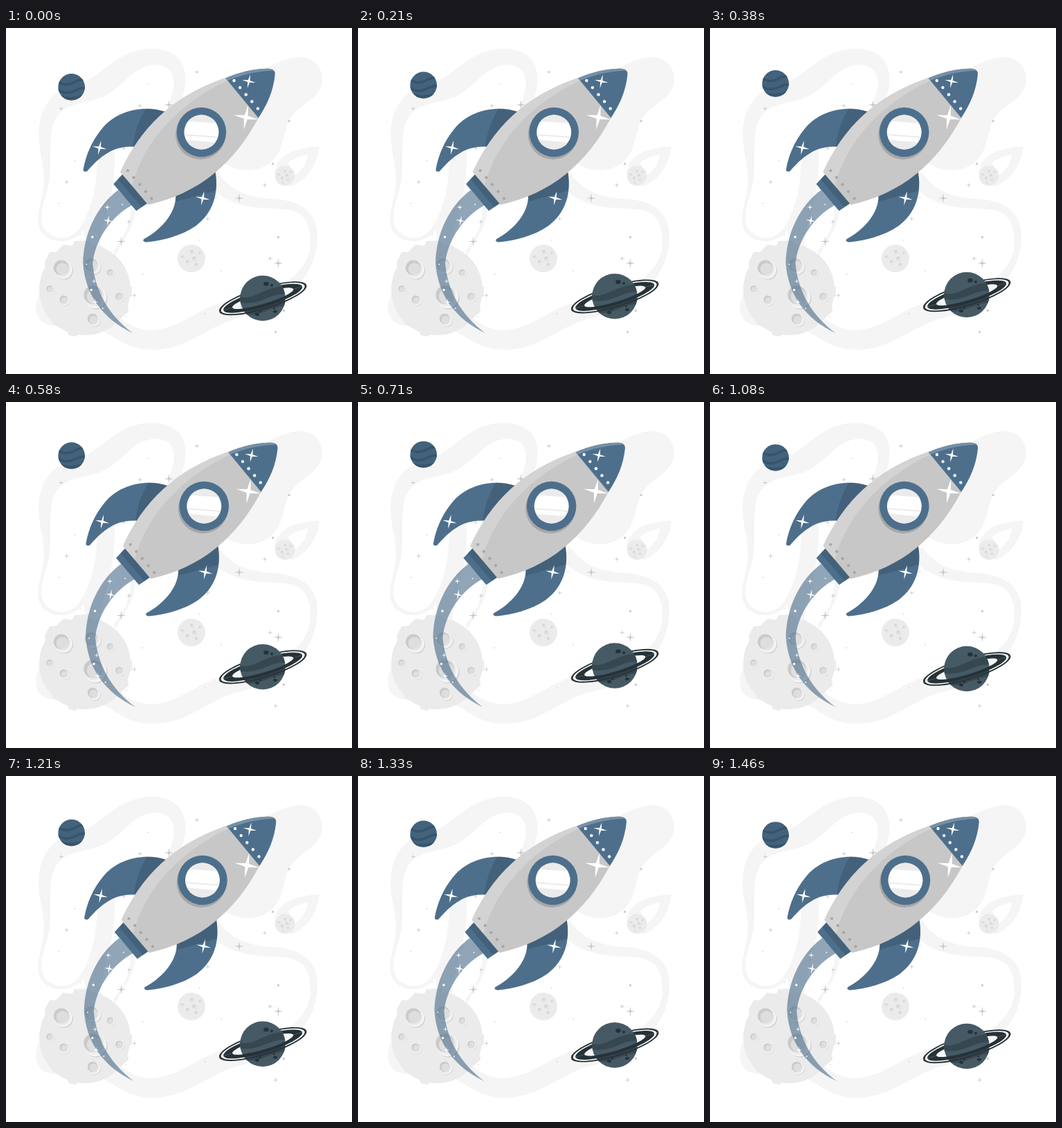
An HTML page that plays this animation: 500 by 500 pixels, repeating every 1.5 s.

```html
<!DOCTYPE html>
<html lang="en">
<head>
<meta charset="utf-8">
<title>Rocket in space</title>
<style>
  html, body { margin: 0; width: 100%; height: 100%; overflow: hidden; background: #fff; }
  svg { display: block; width: 100%; height: 100%; }
  .trail { fill: #f5f5f5; }
  .blue { fill: #4d6f8c; }
  .shade { fill: #000; opacity: .13; }
  .white { fill: #fff; }
  .moon { fill: #ebebeb; }
</style>
</head>
<body>
<svg viewBox="0 0 500 500">
  <defs>
    <clipPath id="discSmall"><circle cx="94.7" cy="85.7" r="19.3"/></clipPath>
    <clipPath id="discLarge"><circle cx="371" cy="390.8" r="32.8"/></clipPath>
    <clipPath id="glass"><circle cx="282.2" cy="150.5" r="25"/></clipPath>
    <path id="halfRing" fill="#263238" d="M-66 0A66 16 0 0 0 66 0H63A63 14 0 0 1-63 0zM-59.500 0A59.500 12.500 0 0 0 59.500 0H46A46 8 0 0 1-46 0z"/>
  </defs>

  <g class="trail">
    <path d="M246 120C262 92 264 62 250 45C232 24 190 27 165 43C135 61 129 75 95 84C56 95 44 130 48 167C52 200 59 215 52 243C44 275 41 299 70 307C86 311 101 305 112 292L118 320H136C136 280 160 250 157 170L131 172C134 215 126 260 108 287C97 304 79 308 63 298C46 286 50 267 58 240C68 211 62 188 65 157C69 102 112 114 143 98C171 84 183 55 215 53C246 53 249 81 234 112Z"/>
    <path d="M187 258C187 287 172 300 159 327L155 324C171 300 180 287 180 258Z"/>
    <path d="M345 70C378 61 397 43 425 42C447 43 458 58 457 77C454 104 420 111 409 134C400 152 402 176 384 193C364 210 335 209 312 193Z"/>
    <path d="M60 370C37 390 39 420 58 428C90 438 108 424 132 434C158 445 174 464 210 465C262 465 283 436 332 420C385 409 449 371 450 303C451 266 426 250 388 247C350 246 323 235 306 208L294 228C328 264 370 259 403 262C436 266 440 287 440 313C435 362 385 380 345 390C284 394 260 434 210 437C166 435 153 400 118 380Z"/>
    <path d="M388 209C391 181 423 173 453 171C450 195 438 218 412 229Z"/>
  </g>
  <path class="white" d="M408 195Q419 185 436 183Q434 202 416 214Z"/>

  <g id="sky" fill="#c7c7c7"></g>

  <g class="moon">
    <circle cx="114" cy="378" r="66"/>
    <path d="M56 338L63 324H72L83 313L96 315L99 308L119 307L125 315H138L145 325L174 352L175 372L182 374V388L175 390L177 410L150 433L104 442L101 446L91 444L88 437L67 427Z"/>
    <circle cx="268" cy="333" r="20"/>
    <circle cx="403" cy="213.500" r="14.500"/>
  </g>
  <g id="craters"></g>

  <g id="smallPlanet">
    <circle cx="94.7" cy="85.7" r="19.3" fill="#43627c"/>
    <g clip-path="url(#discSmall)" fill="none" stroke="#38546c" stroke-width="3.500">
      <path d="M72 76Q86 86 98 79T118 77M73 88Q85 98 99 91T117 89M78 99Q91 105 110 99"/>
    </g>
  </g>

  <g id="ringedPlanet">
    <use href="#halfRing" transform="translate(371.200 391) rotate(-16.800) scale(1 -1)"/>
    <circle cx="371" cy="390.8" r="32.8" fill="#455a64"/>
    <g clip-path="url(#discLarge)" fill="#37474f">
      <path d="M336 388C358 396 370 374 406 373V385C382 382 369 402 337 397ZM338 407C362 413 379 391 407 394V402C381 402 367 419 343 414Z"/>
      <g fill="#263238">
        <ellipse cx="376" cy="370" rx="3.800" ry="3"/><circle cx="384" cy="372" r="2"/>
        <ellipse cx="363" cy="414" rx="3" ry="2.300"/><circle cx="367.500" cy="410" r="1.500"/>
        <ellipse cx="389" cy="410" rx="3" ry="2"/><circle cx="387.500" cy="405.500" r="1.400"/>
      </g>
    </g>
    <use href="#halfRing" transform="translate(371.200 391) rotate(-16.800)"/>
  </g>

  <g id="rocket">
    <path class="blue" opacity=".62" d="M162 234C130 258 112 298 111 339C114 387 141 421 183 441C148 415 128 379 125 340C129 305 152 272 182 256Z"/>
    <path class="blue" d="M230 121C200 111 160 118 138 146C123 164 115 185 111.500 204Q111 209 117 207C132 190 153 168 187 172Z"/>
    <path class="shade" d="M230 121Q215 116 202 116Q187 140 183 170L187 172Z"/>
    <path class="blue" d="M302 206C308 239 299 267 274 286C252 301 226 307 202 309.500Q196 308 199 305C220 294 246 270 245 241Z"/>
    <path class="shade" d="M302 206Q305 222 303 235Q274 243 245 251V241Z"/>
    <path class="blue" d="M155 225.500L168 211.500L204.500 253L188 264.300Z"/>
    <path class="shade" d="M161.500 218.500L168 211.500L204.500 253L196 259Z"/>
    <path fill="#c7c7c7" d="M165 208C193 146 240 98 317 72L364.500 130C329 196 279 239 205 255.500Z"/>
    <path fill="#d3d3d3" d="M165 208C193 146 240 98 317 72L320 76C252 107 199 162 182 228Z"/>
    <path class="blue" d="M317 72.500C340 63 363 58 381 59Q389 60 388.500 67C386 91 378 109 364.500 130Z"/>
    <path fill="#7690a6" d="M317 72.500C340 63 363 58 381 59Q385 59.300 387 61.500C365 62 342 67 320 76Z"/>
    <circle cx="280.700" cy="154" r="36" fill="#a6a6a6"/>
    <circle class="blue" cx="282.200" cy="150.500" r="35.800"/>
    <g clip-path="url(#glass)">
      <rect class="white" x="255" y="124" width="54" height="54"/>
      <path fill="#ebebeb" d="M255 124H309V138L255 134ZM255 153L309 157V159L255 155ZM255 161L309 166V178H255Z"/>
    </g>
    <g id="rivets" fill="#a6a6a6"></g>
    <g id="sparks" class="white"></g>
  </g>
</svg>
<script>
  const $ = id => document.getElementById(id);
  const range = n => [...Array(n).keys()];
  const draw = (id, shape, list) => $(id).insertAdjacentHTML("beforeend", list.map(shape).join(""));

  const circle = (x, y, r, fill) => `<circle cx="${x}" cy="${y}" r="${r}" fill="${fill}"/>`;
  const dot = ([x, y, r]) => `<circle cx="${x}" cy="${y}" r="${r}"/>`;
  const star = ([x, y, r, turn = 0]) =>
    `<path transform="translate(${x} ${y}) rotate(${turn}) scale(${r})" d="M0-1L.14-.14 1 0 .14 .14 0 1-.14 .14-1 0-.14-.14z"/>`;
  const crater = ([x, y, r]) =>
    circle(x + r * .2, y + r * .2, r * .95, "#d0d0d0") +
    circle(x + r * .12, y + r * .12, r * .95, "#f5f5f5") +
    circle(x, y, r * .9, "#ebebeb") +
    circle(x - r * .08, y - r * .08, r * .78, "#cacaca") +
    circle(x + r * .05, y + r * .06, r * .64, "#dedede");

  // Low-discrepancy scatter over the sky
  const scatter = (n, seed, size) => range(n).map(i => [
    50 + 400 * ((seed + i * .7549) % 1), 60 + 380 * ((seed + i * .5698) % 1), size(i)
  ]);
  // Sunflower spread of small craters over a disc
  const pocks = (x, y, radius, n) => range(n).map(i => {
    const d = radius * Math.sqrt((i + .5) / n);
    return [x + d * Math.cos(i * 2.4), y + d * Math.sin(i * 2.4), radius * (.22 - .1 * i / n)];
  });
  const row = (x, y, r) => range(5).map(i => [x + i * 8.6, y + i * 10.1, r]);

  draw("sky", star, [[235.5, 111, 7], [166.5, 308.5, 7], [337, 246, 7], [393.5, 340, 7]]);
  draw("sky", star, scatter(13, .3, () => 4));
  draw("sky", dot, scatter(22, .8, i => i % 4 ? .8 : 1.6));
  draw("craters", crater, [
    [81, 347.5, 14], [63.5, 377.5, 6], [84, 393, 7.5], [126, 421, 9.5],
    [164, 388.5, 6.7], [151, 354, 6], [127, 387, 17], [124, 343, 12]
  ]);
  draw("craters", crater, [...pocks(268, 333, 15, 6), ...pocks(403, 213.5, 11, 7)]);
  draw("rivets", dot, row(175.7, 206, 2.1));
  draw("sparks", dot, row(329.3, 76, 2.2));
  draw("sparks", star, [
    [350.7, 77, 10, 12], [346.5, 129, 18, 10], [135, 173, 10.5, 12], [284, 246, 10.5, 12],
    [147.3, 278.5, 7.5, 10], [146, 259, 4.5], [127, 366, 4], [128.5, 396, 5]
  ]);
  draw("sparks", dot, [[168, 255, .9], [124.5, 302, 1.8], [116, 341.5, .9], [123, 378.5, 1.7], [139.5, 405, 1.1]]);

  const LOOP = 1500, STEPS = 36, LEAD = .015;
  const shake = [0, -1, 2, -4, 4, -4, 4, -4, 2, -1, 0];
  const start = performance.now();

  function frame() {
    const t = Math.max(0, performance.now() - start) % LOOP;
    const step = Math.floor(t / LOOP * STEPS + .1) % STEPS;
    const p = (step / STEPS + LEAD) % 1;
    const i = Math.floor(p * 10);
    const x = .4 + shake[i] + (shake[i + 1] - shake[i]) * (p * 10 - i);
    const lift = -10 * (1 - Math.abs(2 * p - 1));
    $("rocket").setAttribute("transform", `translate(${x} 0)`);
    for (const id of ["smallPlanet", "ringedPlanet"]) $(id).setAttribute("transform", `translate(0 ${lift})`);
    requestAnimationFrame(frame);
  }
  frame();
</script>
</body>
</html>
```
